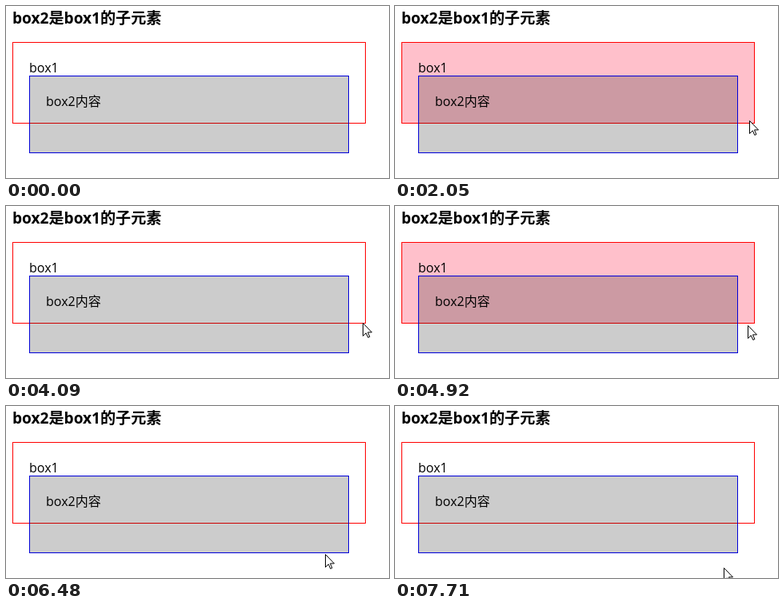
Recreate the animation shown at these times as an HTML page. Size 479x215 px, loop 8000 ms.

```html
<!DOCTYPE html>
<html lang="zh">
<head>
<meta charset="utf-8">
<title>box</title>
<style>
html, body { margin: 0; width: 100%; height: 100%; overflow: hidden; background: #fff; }
svg { display: block; }
text { font: 16px "Open Sans", "Noto Sans CJK SC", "Noto Sans CJK", sans-serif; fill: #000; }
.title { font-size: 19.1px; font-weight: 700; }
</style>
</head>
<body>
<svg width="479" height="215" viewBox="0 0 479 215">
  <text class="title" x="8" y="22">box2是box1的子元素</text>
  <rect id="outer" x="8.5" y="45.5" width="441" height="101" fill="none" stroke="#f00"/>
  <text x="29" y="83">box1</text>
  <rect x="29" y="87" width="400" height="97" fill="rgba(0,0,0,.2)"/>
  <rect x="29.5" y="87.5" width="399" height="96" fill="none" stroke="#0000d8"/>
  <text x="50" y="125">box2内容</text>
  <path id="cursor" fill="#fff" stroke="#000" visibility="hidden"
    d="M.5 .5V16.5L4.3 12.8L6.8 18.4L8.9 17.5L6.5 11.9H11.5Z"/>
</svg>
<script>
const LOOP = 8000;
// time, x, y of the pointer tip
const moves = [
  [1250, 470, 178], [1370, 456, 177], [1510, 446, 169], [1660, 448, 163],
  [1790, 450, 159], [1930, 447, 152], [2050, 443, 143], [2170, 441, 136],
  [2320, 440, 134], [2440, 440, 133], [2840, 441, 138], [3000, 448, 151],
  [3150, 454, 161], [3270, 458, 168], [3670, 459, 164], [3790, 460, 160],
  [3940, 458, 154], [4090, 446, 146], [4210, 441, 140], [4340, 439, 137],
  [4920, 441, 149], [5040, 446, 164], [5160, 451, 181], [5560, 450, 187],
  [5680, 447, 193], [5830, 443, 198], [5950, 438, 202], [6070, 432, 204],
  [6350, 414, 195], [6480, 399, 185], [6630, 397, 178], [7470, 401, 181],
  [7590, 407, 192], [7710, 411, 202]
];
const hovers = [[2050, 3150], [4210, 5040], [6630, 7590]];
const outer = document.getElementById("outer");
const cursor = document.getElementById("cursor");

function draw(now) {
  const t = now % LOOP;
  const pos = moves.filter(m => m[0] <= t).pop();
  const hover = hovers.some(([on, off]) => t >= on && t < off);
  outer.setAttribute("fill", hover ? "pink" : "none");
  cursor.setAttribute("visibility", pos ? "visible" : "hidden");
  if (pos) cursor.setAttribute("transform", `translate(${pos[1]} ${pos[2]})`);
}

const start = performance.now();
function tick() {
  draw(performance.now() - start);
  requestAnimationFrame(tick);
}
tick();
</script>
</body>
</html>
```
